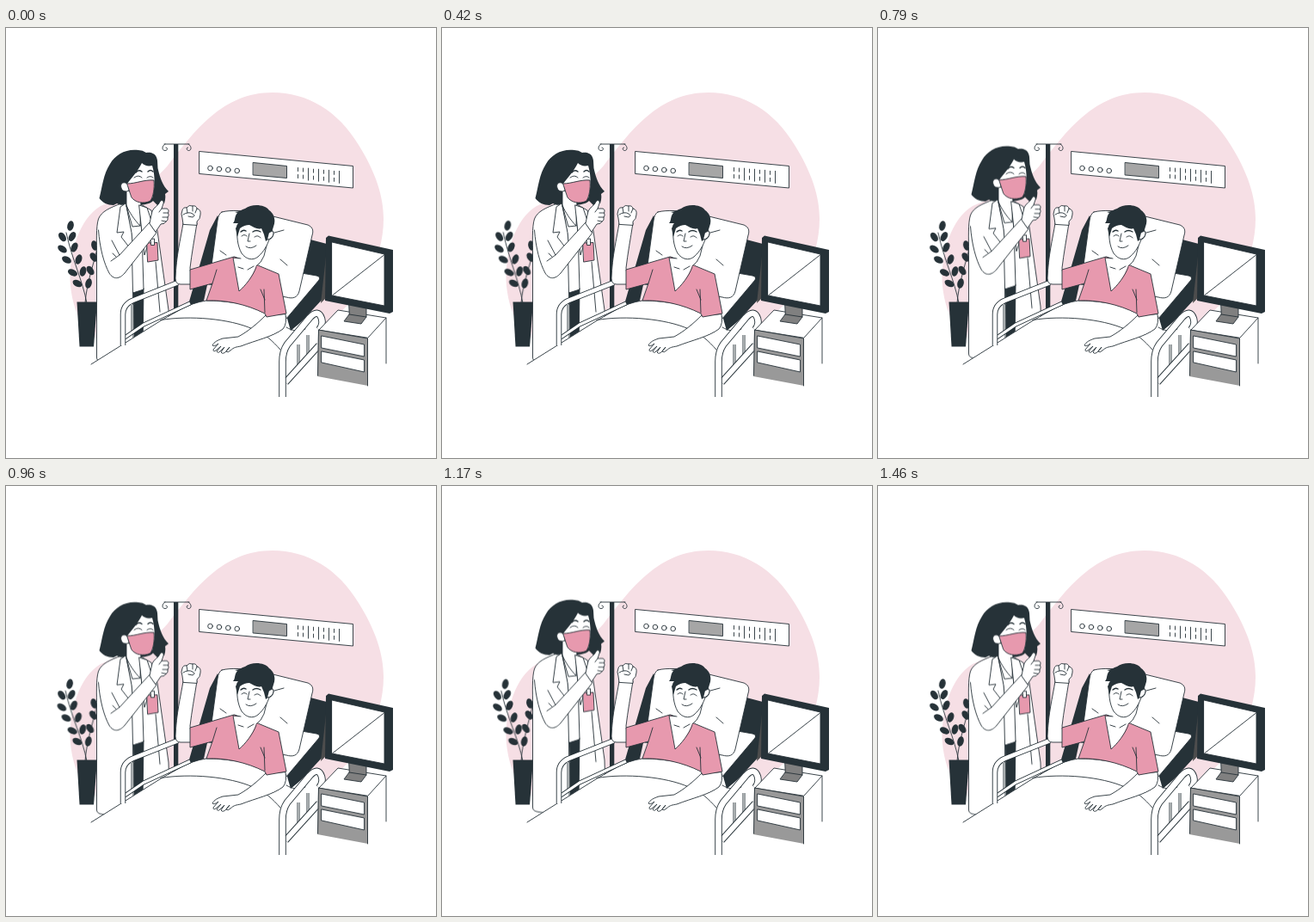
An HTML page for the animation above (1.5 s loop, 500 by 500 pixels).

```html
<!DOCTYPE html>
<html lang="en">
<head>
<meta charset="utf-8">
<title>Hospital visit</title>
<style>
html, body { margin: 0; width: 100%; height: 100%; overflow: hidden; background: #fff; }
svg { display: block; width: 100%; height: 100%; }
.ink { fill: #263238; stroke: none; }
.pink { fill: #e799ae; }
.grey { fill: #a6a6a6; }
.line { fill: none; }
#leaves { transform-origin: 94px 320px; }
</style>
</head>
<body>
<svg viewBox="0 0 500 500" fill="#fff" stroke="#263238" stroke-width="0.9" stroke-linecap="round" stroke-linejoin="round">
  <path fill="#f6dfe5" stroke="none" d="M310 75C350 75 386 96 410 136C430 168 439 196 439 222C439 272 410 318 372 344L330 380L230 345L130 372C96 364 79 338 75 300C72 262 86 221 110 207C142 193 168 184 188 160C220 119 252 75 310 75Z"/>

  <g id="pole">
    <path class="line" d="M184 135H213M185 135C181 137 181 142.500 185 142.500C188 142.500 188.500 139 186 139M212 135C216 137 216 142.500 212.500 142.500C210 142.500 209 139 211.500 139"/>
    <path class="ink" d="M195 135H200.300V326H195Z"/>
  </g>

  <g id="panel">
    <path d="M225 143.500L403.500 160.500V186L225 169.500Z"/>
    <path class="grey" d="M287.500 156.500L326.500 160.500V174.500L287.500 171Z"/>
    <g id="dials"></g>
    <g id="ticks"></g>
  </g>

  <g id="leaves">
    <path class="line" d="M94 320C89 293 77 270 70 238M92 320C94 295 101 279 107 252"/>
  </g>
  <path class="ink" d="M82.500 318.500H106L102 370.500H85.500Z"/>

  <g id="doctor">
    <path d="M134 204C121 209 111 213 107.500 222C104.500 231 105.500 250 105.500 264V383C105.500 386 107 387 110 388L128 391L190 366L189 328L176 236L169 212L153 203Z"/>
    <path class="ink" d="M148 307L160 303L159 374L149 380Z"/>
    <path d="M139 205L146 240L147.500 308L160 304L158 238L155 205Z"/>
    <path class="line" d="M160 303L159 372M174 272L179 330M147.500 308L148 370"/>
    <!-- hair, neck and face -->
    <path class="ink" d="M154 142C140 140 127 147 121 158C113 170 112 185 108.500 198C112 203 118 206 125 206L129 204C133 207 140 206 143 203C154 207 166 206 171 201L176 206Q181 206 182 203L184 204Q186 198 185 193L189 190C182 183 179 174 176.500 163L176 154C175 146 169 144 163 145Q159 142 154 142Z"/>
    <path d="M140 188L140 206C143 214 150 224 156 230L157 200Z"/>
    <path stroke="none" d="M158 157C153 167 147 173 141 181L143 190L148 197L170 198C173 188 174 173 170 160C165 161 161 160 158 157Z"/>
    <path d="M142 182C137 177 132 181 134 186C135 190 140 191 143 189Z"/>
    <path class="line" d="M151 168Q154 164 158 167M165 167Q168 164 171 167" stroke-width="1.400"/>
    <path class="line" d="M149 174Q154 170 158 174M164 174Q168 171 171 174"/>
    <path class="pink" d="M141 181C151 181 161 176 172 177C173 187 171 196 168 201C160 205 150 203 146 197Z"/>
    <!-- lapels -->
    <path d="M139 204L133 208L129 238L137 237L134 243L148 261L146 238Z"/>
    <path d="M155 206L164 209L170 227L167 233L170 236L161 264L158 238Z"/>
    <path class="line" d="M140 207L147 231L156 230"/>
    <!-- badge -->
    <path class="pink" d="M164 250L176 249.500L177 270L165 272Z"/>
    <path d="M168.500 245.500L172.500 245V252.500H169Z"/>
    <!-- raised arm -->
    <path d="M107.500 235C109 256 114 274 120 285C125 293 132 292 138 285L175 238L167 226L132 264L123 247"/>
    <path class="line" d="M132 264L122 271M128 266L124 262"/>
    <path d="M167 227L170 213C172 208 177 207 179 202C181 199 184 201 183 204L181 210L187 210Q190 211 188.500 215Q190 218 188 220Q189 224 186 225Q185 228 180 228L174 237Z"/>
    <path class="line" d="M181 210L178 214M188 215H183M188 220H182M186 225L181 224"/>
  </g>

  <g id="bed">
    <path class="ink" d="M246 218L237 235L213 318L188 332L203 331L230 317L242 262L248 222ZM350 245L373 251L371 312L332 354L318 344L340 288Z"/>
    <path fill="#4d4d4d" stroke="none" d="M372 266V314L366 320Z"/>
    <path d="M338 284L361 288Q366 289 364 293L326 338L300 325Z"/>
    <path d="M251 214C262 211 278 213 290 214L351 229C356 231 358 235 356 241L341 306C339 314 333 315 326 313L236 298L246 224Q247 216 251 214Z"/>
    <path class="line" d="M312 238L323 235M249 259L256 264M319 269L327 276"/>
  </g>

  <g id="sheet">
    <path stroke="none" d="M99 391L180 340C196 332 211 320 233 317C262 315 298 324 327 338L331 352L354 333Q366 326 369 340L366 372L317 430Z"/>
    <path class="line" d="M99 391L182 339C196 332 211 320 233 317C262 317 298 324 326 336M180 339.500C214 334 260 338 287 350C302 356 310 364 319 374M326 348C334 353 342 353 348 350"/>
  </g>

  <g id="rails"></g>

  <g id="patient">
    <!-- raised arm -->
    <path d="M206 227C203 246 198 264 197 291Q197 298 203 298L216 298L214 279C216 262 219 246 222 227Z"/>
    <path d="M206 228L205 221Q203 216 205 212Q206 208 210 209Q213 205 217 207Q221 206 222 210Q227 211 226 217Q226 222 222 225L222 229Z"/>
    <path class="line" d="M210 209L211 215M217 207V213M222 210L220 215M206 217Q212 213 217 216Q221 218 217 220L212 219"/>
    <!-- resting arm -->
    <path d="M302 334C291 345 281 353 270 359L252 361C246 363 242 365 240 369Q242 371 247 367L241 374Q241 377 244 375L250 370L245 376Q246 379 249 376L254 371L250 377Q252 380 256 376L260 371L256 376Q258 378 261 375C265 371 268 371 273 370C291 363 310 359 322 350Q327 344 325 333Z"/>
    <!-- shirt -->
    <path class="pink" d="M265 266L214 281V304L240 297L233 317C255 316 279 321 301 332L303 336L326 332L317 286L293 276Z"/>
    <path class="line" d="M240 297L245 281M301 331L300 304M296 304L301 316"/>
    <path d="M273 257L272 268L264 268L271 306C278 300 287 289 291 276L304 270V251Z" stroke="none"/>
    <path class="line" d="M273 268L264 267L271 306C278 300 287 289 291 278M270 278L276 280M281 281L288 277M303 253L300 265Q297 273 291 277"/>
    <path d="M269 229C268 242 269 253 274 262C279 269 287 271 293 266C300 260 304 252 306 246C312 244 313 235 307 234L304 224L276 224Z"/>
    <path class="ink" d="M269 243L267 233L270 227L264 227C267 224 265 220 269 215L266 214C271 214 274 211 278 210C286 204 301 205 306 212C312 216 314 224 311 231L307 244L302 248L300 240L297 233C292 235 288 231 283 229Q277 229 272 233Z"/>
    <path d="M306 238Q311 234 311 239Q310 245 304 246"/>
    <path class="line" d="M273 237Q276 234 279 236M287 237Q291 234 296 237" stroke-width="1.400"/>
    <path class="line" d="M274 242Q277 239 280 242M289 243Q293 240 296 244M283 239L281 248H284M279 254Q284 258 291 253"/>
  </g>

  <g id="cabinet">
    <path stroke="none" d="M421 360L442 337V391L421 416Z"/>
    <path d="M364 351L386 328L442 337L421 360Z"/>
    <path class="line" d="M442 337V390"/>
    <path fill="#999" stroke="none" d="M363 351L421 361V416L362 405Z"/>
    <path class="line" d="M362.500 404L363.500 351L420.500 361V416"/>
    <path d="M367 358L416.500 368V382L367 372ZM367 376L416.500 386V400L367 389Z"/>
    <path fill="#808080" d="M399 321L419 325V336L413 344L393 341L399 333Z"/>
    <path class="line" d="M399 333L419 336"/>
    <path class="ink" d="M375 241.500L450 258V330L446 332L371 317L372 244Z"/>
    <path d="M379 249L440 263V323L379 311Z"/>
    <path class="line" d="M380 310.500L439.500 264"/>
  </g>
</svg>
<script>
const NS = 'http://www.w3.org/2000/svg';
const LOOP = 1500;

function add(id, tag, attrs) {
  const el = document.createElementNS(NS, tag);
  for (const key in attrs) el.setAttribute(key, attrs[key]);
  document.getElementById(id).append(el);
}

// Outlined tube: a dark stroke with a narrower white one on top
function tube(d, width) {
  const base = { d, class: 'line', 'stroke-linecap': 'butt' };
  add('rails', 'path', { ...base, 'stroke-width': width });
  add('rails', 'path', { ...base, 'stroke-width': width - 1.8, stroke: '#fff' });
}

function play(id, frames) {
  document.getElementById(id).animate(
    frames.map(([ms, transform]) => ({ offset: ms / LOOP, transform })),
    { duration: LOOP, iterations: Infinity });
}

for (let i = 0; i < 4; i++) add('dials', 'circle', { cx: 237.5 + i * 10.4, cy: 163 + i, r: 2.8 });

[...'dd|d|d|d|'].forEach((kind, i) => {
  const x = 339.5 + i * 6, y = 162 + i * 0.55;
  add('ticks', 'path', {
    d: kind === '|' ? `M${x} ${y}v14` : `M${x} ${y + 0.5}v4m0 4v4`,
    class: 'line'
  });
});

// x, y, tilt
[
  [75, 230, 12], [65.5, 243, -35], [77, 242.5, 30], [65.5, 257, -55], [79.5, 255, 25],
  [70.5, 269.5, -60], [84.5, 269, 20], [77.5, 284.5, -65], [89.5, 283, 15], [83, 297, -60],
  [96, 297, 15], [103, 253, -15], [102, 266.5, -35], [98, 282, -35]
].forEach(([x, y, tilt]) => add('leaves', 'ellipse', {
  cx: x, cy: y, rx: 3.7, ry: 5.9, class: 'ink', transform: `rotate(${tilt} ${x} ${y})`
}));

tube('M147 322V352', 3);
tube('M138 360L160 345L214 320', 5);
tube('M136 369V333Q136 322 147 317L200 296', 6.5);
for (const x of [340, 351]) tube(`M${x} ${708 - x}V${733 - x}`, 3);
tube('M325 412L364 369', 8);
tube('M321.500 429V388Q321.500 376 327 368L353 337Q363 326 367 338Q369 345 364 351', 8.5);

play('leaves', [
  [0, 'rotate(0deg)'], [375, 'rotate(1deg)'], [1125, 'rotate(-1deg)'], [LOOP, 'rotate(0deg)']
]);
// Waits, rises, then drops back hard at the loop point
play('doctor', [
  [0, 'translateY(0px)'], [460, 'translateY(0px)'], [1210, 'translateY(-10px)'], [LOOP, 'translateY(-6.1px)']
]);
</script>
</body>
</html>
```
